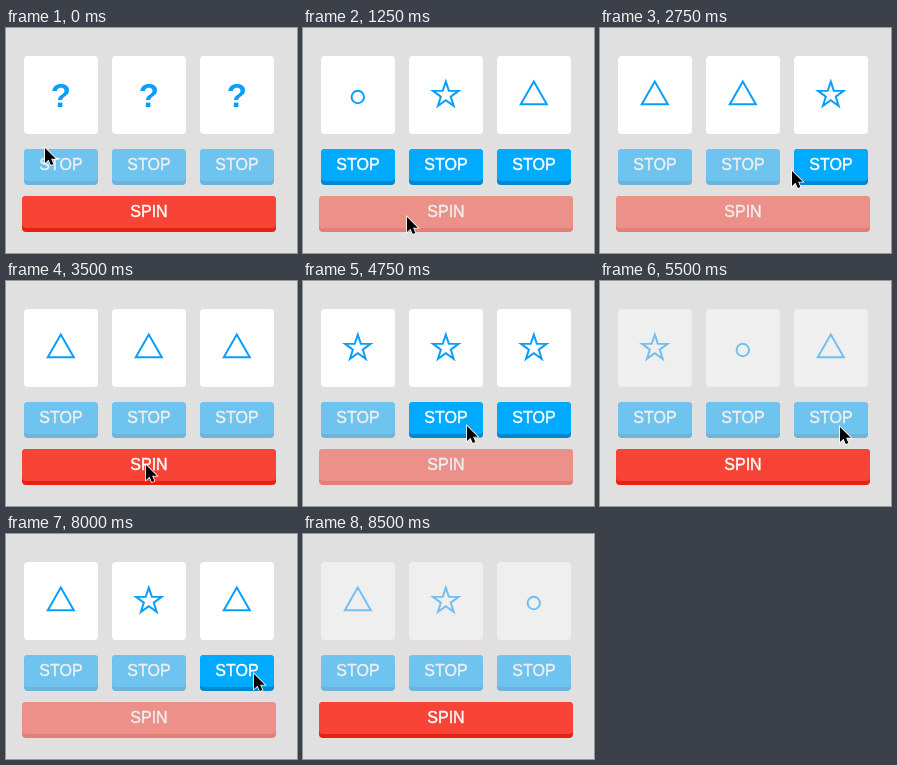
An HTML page that plays this animation: 291x225 px, repeating every 9500 ms.

```html
<!DOCTYPE html>
<html lang="en">
<head>
<meta charset="utf-8">
<title>Slot machine</title>
<style>
  html, body { margin: 0; width: 100%; height: 100%; overflow: hidden; background: #e0e0e0; }
  svg { display: block; width: 291px; height: 225px; }
  text { font-family: "Liberation Sans", Arial, sans-serif; text-anchor: middle; }
  .label { font-size: 16px; fill: #fff; stroke: #fff; stroke-width: .4; }
  .mark { font-size: 33px; font-weight: bold; fill: #0a9fff; }
  .shape { fill: none; stroke: #0a9fff; stroke-width: 2; stroke-miterlimit: 5; }
  .dim { opacity: .5; }
</style>
</head>
<body>
<svg id="stage" viewBox="0 0 291 225"></svg>
<script>
const TICK = 250, LOOP = 9500, LAST = 34;
const stage = document.getElementById('stage');

// Each reel lists one symbol per tick from its spin; it stops on the last one.
const rounds = [
  { start: 4, reels: ['SCST', 'TSCTCST', 'CTCSSTCST'] },
  { start: 15, reels: ['TCTS', 'CTCTSC', 'STCTSCST'] },
  { start: 26, reels: ['SCT', 'TCSCS', 'CSTCSCTC'] }
];

// Pointer path: tick, x, y
const path = [
  [0, 39, 120], [2, 105, 178], [3, 118, 195], [4, 112, 192], [5, 104, 189],
  [6, 72, 152], [7, 68, 142], [8, 102, 140], [9, 150, 142], [10, 154, 143],
  [12, 230, 143], [13, 226, 146], [14, 140, 184], [15, 138, 185],
  [16, 92, 158], [17, 74, 146], [18, 90, 146], [19, 164, 145], [20, 166, 145],
  [22, 240, 146], [23, 236, 148], [24, 170, 182], [25, 146, 192],
  [26, 74, 148], [27, 78, 147], [28, 110, 147], [29, 164, 146],
  [30, 172, 145], [31, 226, 142], [32, 248, 140], [33, 248, 140]
];

function add(parent, tag, attrs, text) {
  const el = document.createElementNS('http://www.w3.org/2000/svg', tag);
  for (const key in attrs) el.setAttribute(key, attrs[key]);
  if (text) el.textContent = text;
  parent.append(el);
  return el;
}

function button(x, y, w, face, edge, label) {
  const g = add(stage, 'g', {});
  add(g, 'rect', { x, y, width: w, height: 36, rx: 4, fill: edge });
  add(g, 'path', {
    d: `M${x} ${y + 28}v-24q0-4 4-4h${w - 8}q4 0 4 4v24q0 4-4 4h${8 - w}q-4 0-4-4z`,
    fill: face
  });
  add(g, 'text', { x: x + w / 2, y: y + 21, class: 'label' }, label);
  return g;
}

const starPoints = Array.from({ length: 10 }, (_, i) => {
  const r = i % 2 ? 5.2 : 13.4, a = i * Math.PI / 5;
  return [r * Math.sin(a), 67 - r * Math.cos(a)].map(v => v.toFixed(2)).join();
}).join(' ');

function slot(i) {
  const x = 18 + 88 * i;
  const card = add(stage, 'g', {});
  add(card, 'rect', { x, y: 28, width: 74, height: 78, rx: 4, fill: '#fff' });
  const face = add(card, 'g', { transform: `translate(${x + 36.8})` });
  const symbols = {
    '?': add(face, 'text', { y: 79, class: 'mark' }, '?'),
    T: add(face, 'path', { d: 'M0 53.6L-13 76.3H13Z', class: 'shape' }),
    C: add(face, 'circle', { cy: 69, r: 6.2, class: 'shape' }),
    S: add(face, 'polygon', { points: starPoints, class: 'shape' })
  };
  return { card, symbols, stop: button(x, 121, 74, '#00aaff', '#0087d2', 'STOP') };
}

const slots = [0, 1, 2].map(slot);
const spin = button(16, 168, 254, '#f74436', '#e82010', 'SPIN');
const pointer = add(stage, 'path', {
  d: 'M0 0V15L3.5 11.7L5.8 17L8.4 15.9L6.1 10.8H10.8Z',
  fill: '#000', stroke: '#fff', 'stroke-width': 1.6, 'paint-order': 'stroke'
});

function pointerAt(tick) {
  const next = path.findIndex(p => p[0] >= tick);
  const b = path[next], a = path[Math.max(0, next - 1)];
  const k = b[0] === a[0] ? 0 : (tick - a[0]) / (b[0] - a[0]);
  return [1, 2].map(n => a[n] + (b[n] - a[n]) * k);
}

function draw(tick) {
  const round = rounds.filter(r => r.start <= tick).pop();
  const states = slots.map((_, i) => {
    if (!round) return { symbol: '?', spinning: false };
    const reel = round.reels[i], step = tick - round.start;
    return { symbol: reel[Math.min(step, reel.length - 1)], spinning: step < reel.length - 1 };
  });
  const busy = states.some(s => s.spinning);
  const lost = !busy && states.some(s => s.symbol !== states[0].symbol);

  slots.forEach(({ card, symbols, stop }, i) => {
    for (const key in symbols)
      symbols[key].style.display = key === states[i].symbol ? '' : 'none';
    card.classList.toggle('dim', lost);
    stop.classList.toggle('dim', !states[i].spinning);
  });
  spin.classList.toggle('dim', busy);

  pointer.style.display = tick < LAST ? '' : 'none';
  if (tick < LAST) pointer.setAttribute('transform', `translate(${pointerAt(tick)})`);
}

const begin = performance.now();
let shown = -1;
function frame() {
  const time = (performance.now() - begin) % LOOP;
  const tick = Math.min(LAST, Math.floor(time / TICK));
  if (tick !== shown) draw(shown = tick);
  requestAnimationFrame(frame);
}
frame();
</script>
</body>
</html>
```
